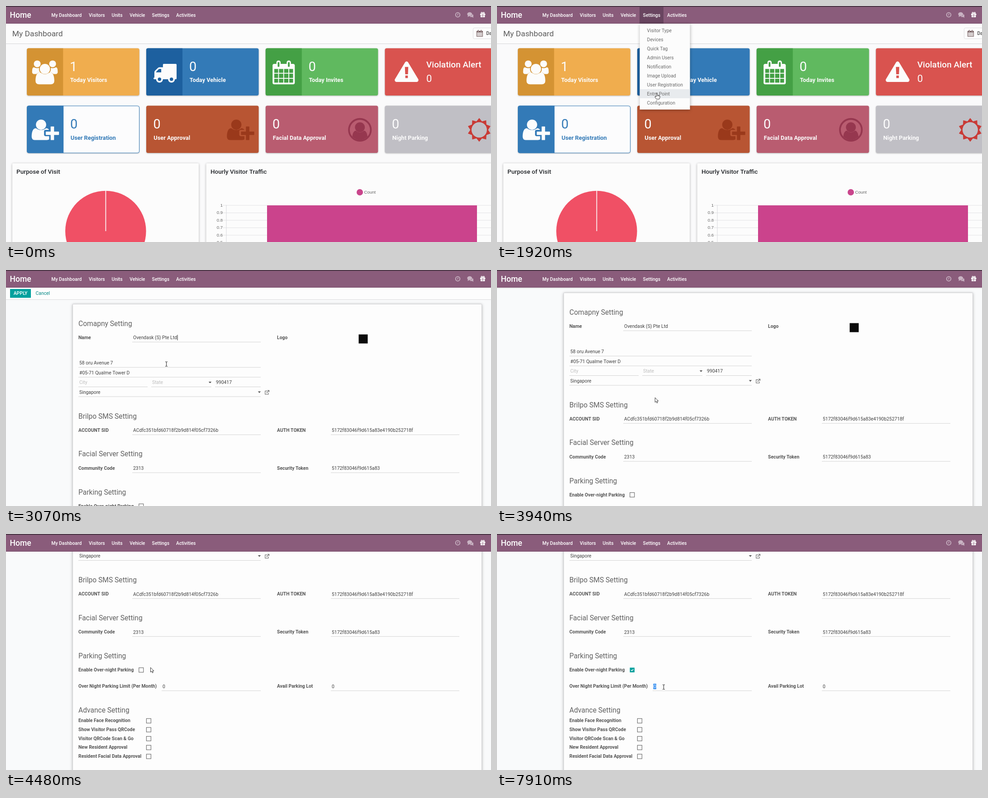
An HTML page with a canvas that plays this animation: 1072x522 px, repeating every 8000 ms.

```html
<!DOCTYPE html>
<html lang="en">
<head>
<meta charset="utf-8">
<title>Dashboard settings</title>
<style>
  html, body { margin: 0; width: 100%; height: 100%; overflow: hidden; background: #fafafb; }
  canvas { display: block; }
</style>
</head>
<body>
<canvas id="stage" width="1072" height="522"></canvas>
<script>
const ctx = document.getElementById('stage').getContext('2d');
const W = 1072, H = 522, LOOP = 8000, TAU = Math.PI * 2;
const TEAL = '#00a09d', INK = '#404040', ICON = 0.0295;

// ---------- helpers ----------
function text(str, x, y, size, color, weight = 400, family = 'Roboto') {
  ctx.font = `${weight} ${size}px "${family}", sans-serif`;
  ctx.fillStyle = color;
  ctx.fillText(str, x, y);
}
function rect(x, y, w, h, color) {
  ctx.fillStyle = color;
  ctx.fillRect(x, y, w, h);
}
function box(x, y, w, h, r, fill, stroke) {
  ctx.beginPath();
  ctx.roundRect(x, y, w, h, r);
  if (fill) { ctx.fillStyle = fill; ctx.fill(); }
  if (stroke) { ctx.strokeStyle = stroke; ctx.lineWidth = 1; ctx.stroke(); }
}
function disc(x, y, r, color) {
  ctx.fillStyle = color;
  ctx.beginPath();
  ctx.arc(x, y, r, 0, TAU);
  ctx.fill();
}
function shape(d, color, rule) {
  ctx.fillStyle = color;
  ctx.fill(new Path2D(d), rule || 'nonzero');
}
function raised(blur, alpha, draw) {
  ctx.save();
  ctx.shadowColor = `rgba(0,0,0,${alpha})`;
  ctx.shadowBlur = blur;
  ctx.shadowOffsetY = 1;
  draw();
  ctx.restore();
}
function at(x, y, s, draw) {
  ctx.save();
  ctx.translate(x, y);
  ctx.scale(s, s);
  draw();
  ctx.restore();
}

// ---------- icons, on a 1792-unit em ----------
function usersIcon(c) {
  const side = 'M593 896Q431 901 328 1024H194Q0 1024 0 865Q0 512 124 512C200 530 260 576 384 576Q451 576 517 553Q490 730 593 896Z';
  for (const flip of [1, -1]) {
    ctx.save();
    if (flip < 0) { ctx.translate(1920, 0); ctx.scale(-1, 1); }
    disc(384, 256, 256, c);
    shape(side, c);
    ctx.restore();
  }
  disc(960, 640, 384, c);
  shape('M1664 1533Q1664 1792 1397 1792H523Q256 1792 256 1533C256 1200 340 896 576 896C640 900 760 1035 960 1035C1160 1035 1280 900 1344 896C1580 896 1664 1200 1664 1533Z', c);
}
function truckIcon(c, bg) {
  box(768, 256, 1024, 1100, 64, c);
  box(64, 1280, 1728, 128, 60, c);
  shape('M128 1300V890Q128 820 180 770L380 570Q430 512 500 512H800V1340H128Z', c);
  shape('M256 896V860L470 640H640V896Z', bg);
  for (const x of [512, 1408]) {
    disc(x, 1408, 256, c);
    disc(x, 1408, 128, bg);
  }
}
function calendarIcon(c, bg) {
  box(0, 256, 1664, 1536, 128, c);
  for (const x of [288, 1056]) {
    box(x, 0, 320, 560, 160, c);
    box(x + 96, 128, 128, 352, 32, bg);
  }
  const cols = [[128, 288], [480, 320], [864, 320], [1248, 288]];
  const rows = [[640, 288], [992, 320], [1376, 288]];
  for (const [x, w] of cols) for (const [y, h] of rows) rect(x, y, w, h, bg);
}
function alertIcon(c, bg) {
  shape('M784 195Q896 50 1008 195L1776 1476Q1820 1640 1664 1664H128Q-28 1640 16 1476Z', c);
  shape('M770 544H1022L1000 1090H792Z', bg);
  rect(800, 1186, 192, 190, bg);
}
function userPlusIcon(c) {
  disc(704, 512, 384, c);
  box(1056, 1024, 992, 256, 32, c);
  box(1424, 640, 256, 1024, 32, c);
  shape('M928 1248Q928 1376 1056 1376H1312V1614Q1244 1664 1141 1664H267Q0 1664 0 1405C0 1072 84 768 320 768C350 768 450 907 704 907C958 907 1058 768 1088 768Q1220 768 1305 896H1056Q928 896 928 992Z', c);
}
function personRing(c) {
  ctx.strokeStyle = c;
  ctx.lineWidth = 128;
  ctx.beginPath();
  ctx.arc(896, 896, 820, 0, TAU);
  ctx.stroke();
  disc(896, 704, 370, c);
  shape('M330 1400C350 1120 460 960 600 960Q740 1090 896 1090T1192 960C1332 960 1442 1120 1462 1400Q1220 1664 896 1664T330 1400Z', c);
}
function sunIcon(c) {
  ctx.fillStyle = c;
  ctx.beginPath();
  for (let i = 0; i < 20; i++) {
    const r = i % 2 ? 668 : 890, a = i * TAU / 20 - TAU / 4;
    ctx.lineTo(896 + r * Math.cos(a), 896 + r * Math.sin(a));
  }
  ctx.closePath();
  ctx.moveTo(1472, 896);
  ctx.arc(896, 896, 576, 0, TAU);
  ctx.fill('evenodd');
}

// ---------- navigation bar ----------
const NAV = [['My Dashboard', 100.3], ['Visitors', 183], ['Units', 233.6], ['Vehicle', 273.2], ['Settings', 322.6], ['Activities', 376]];

function navBar(active) {
  rect(0, 0, W, 39, '#8a5c7b');
  if (active === 'Settings') rect(315, 2, 53, 37, '#694560');
  if (active === 'Activities') rect(368, 2, 58, 37, '#694560');
  rect(0, 38, W, 1, 'rgba(70,35,60,.3)');
  rect(0, 0, W, 1.7, '#3b2c38');
  text('Home', 8.4, 26, 17.6, '#fff', 500);
  for (const [label, x] of NAV) text(label, x, 23.7, 10.4, '#fff', 500);

  const dim = '#c9b3c3';
  ctx.strokeStyle = dim;
  ctx.lineWidth = 1.8;
  ctx.beginPath();
  ctx.arc(998.5, 19.5, 4.8, 0, TAU);
  ctx.stroke();
  ctx.lineWidth = 1.2;
  ctx.stroke(new Path2D('M999 16.5V20H996.5'));
  ctx.fillStyle = dim;
  ctx.beginPath();
  ctx.ellipse(1028.5, 21, 4.6, 3.6, 0, 0, TAU);
  ctx.fill();
  shape('M1029 23L1033 26.3L1032.5 21Z', dim);
  ctx.fillStyle = dim;
  ctx.strokeStyle = '#8a5c7b';
  ctx.beginPath();
  ctx.ellipse(1024.8, 18, 5.4, 4.2, 0, 0, TAU);
  ctx.stroke();
  ctx.fill();
  shape('M1021 20L1020.5 24.5L1025 21.5Z', dim);

  box(1048, 17, 11.4, 3.3, 0.6, '#fff');
  box(1049, 20.6, 9.4, 4.4, 0.8, '#fff');
  rect(1052.4, 17.6, 0.7, 7, '#8a5c7b');
  rect(1054.4, 17.6, 0.7, 7, '#8a5c7b');
  ctx.strokeStyle = '#fff';
  ctx.lineWidth = 1.4;
  ctx.beginPath();
  ctx.arc(1051.6, 15.5, 1.5, 0, TAU);
  ctx.moveTo(1057.4, 15.5);
  ctx.arc(1055.9, 15.5, 1.5, 0, TAU);
  ctx.stroke();
}

// ---------- dashboard ----------
function card(x, y, fill, side) {
  raised(3, 0.28, () => box(x, y, 248.5, 104.5, 4, fill));
  if (side) box(x, y, 80, 104.5, [4, 0, 0, 4], side);
}
function figure(num, label, x, y, color) {
  text(num, x - 1, y, 28.8, color);
  text(label, x - 0.2, y + 24.3, 12.8, color, 700);
}
function dashboard() {
  rect(0, 0, W, H, '#fafafb');
  rect(0, 39, W, 44, '#fcfcfc');
  rect(0, 83, W, 1, '#d4d4d8');
  text('My Dashboard', 13.8, 66.6, 17.4, '#5c5c5c');
  box(1032.5, 48.5, 60, 24, 3, '#fdfdfd', '#dddde0');
  at(1040, 53, 0.0084, () => calendarIcon('#6e5557', '#fdfdfd'));
  text('Dates', 1061.5, 64.3, 10.4, '#444', 500);

  const xs = [46.2, 310, 573.8, 837.5], y1 = 93.5, y2 = 220.6;
  card(xs[0], y1, '#f0ad4e', '#d49333');
  card(xs[1], y1, '#337ab7', '#1d609f');
  card(xs[2], y1, '#60b95f', '#44a045');
  card(xs[3], y1, '#d9534f');
  card(xs[0], y2, '#fcfcfd');
  card(xs[1], y2, '#b85533');
  card(xs[2], y2, '#b95c70');
  card(xs[3], y2, '#c0bfc5');
  box(xs[0], y2, 81, 104.5, [4, 0, 0, 4], '#337ab7');
  box(xs[0] + 0.4, y2 + 0.4, 248, 104, 4, null, '#337ab7');

  at(57.7, 120.4, ICON, () => usersIcon('#fcfcfc'));
  at(324.2, 120.4, ICON, () => truckIcon('#fcfcfc', '#1d609f'));
  at(589.2, 120.4, ICON, () => calendarIcon('#fcfcfc', '#44a045'));
  at(859, 118.8, ICON, () => alertIcon('#fcfcfc', '#d9534f'));
  at(56.7, 247.5, ICON, () => userPlusIcon('#fcfcfc'));
  at(488.3, 247.5, ICON, () => userPlusIcon('#9a391b'));
  at(755.8, 247.5, ICON, () => personRing('#96374f'));
  at(1019.5, 247.5, ICON, () => sunIcon('#c93a35'));

  figure('1', 'Today Visitors', 142, 144, '#fcfcfc');
  figure('0', 'Today Vehicle', 406, 144, '#fcfcfc');
  figure('0', 'Today Invites', 669.7, 144, '#fcfcfc');
  text('Violation Alert', 929, 136, 19, '#fcfcfc', 500);
  text('0', 929, 167.5, 22, '#fcfcfc');
  figure('0', 'User Registration', 143, 271.2, '#337ab7');
  figure('0', 'User Approval', 326.5, 271.2, '#fcfcfc');
  figure('0', 'Facial Data Approval', 590, 271.2, '#fcfcfc');
  figure('0', 'Night Parking', 854, 271.2, '#fcfcfc');

  raised(5, 0.3, () => {
    box(14, 348, 412, 220, 2, '#fcfcfc');
    box(442.5, 348, 700, 220, 2, '#fcfcfc');
  });
  text('Purpose of Visit', 23, 370.8, 13.5, '#222529', 500);
  text('Hourly Visitor Traffic', 452, 370.8, 13.5, '#222529', 500);
  disc(220.3, 498, 89.3, '#f05065');
  rect(219.6, 408, 1.7, 90, '#fcfcfc');

  disc(782, 412, 7, '#c9458c');
  text('Count', 791.5, 415.2, 9.6, '#666', 400, 'Liberation Sans');
  ctx.textAlign = 'right';
  for (let i = 0; i < 6; i++) {
    const y = 440.5 + i * 16.5;
    rect(479, y, W - 479, 0.9, '#dfdfe2');
    text(i ? '0.' + (10 - i) : '1', 479, y + 3.3, 9.6, '#666', 400, 'Liberation Sans');
  }
  ctx.textAlign = 'left';
  rect(486.6, 440, 0.9, 90, '#d6d6da');
  rect(577, 441, 464, 90, '#cb438c');
}

const MENU = ['Visitor Type', 'Devices', 'Quick Tag', 'Admin Users', 'Notification',
  'Image Upload', 'User Registration', 'Entry Point', 'Configuration'];

function dropdown(y) {
  raised(7, 0.35, () => rect(315.5, 39, 111, 190, '#fcfcfc'));
  const row = Math.floor((y - 44) / 20);
  if (row >= 0 && row < MENU.length) rect(316, 44 + row * 20, 110.5, 20, '#e8ebee');
  MENU.forEach((item, i) => text(item, 331.6, 57.9 + i * 20, 10.4, '#6a6a6a'));
}

// ---------- settings form ----------
function heading(str, y) { text(str, 160, y, 15.6, '#616161'); }
function label(str, x, y) { text(str, x, y, 10.4, '#555', 700); }
function line(x, x2, y) { rect(x, y, x2 - x, 0.9, '#cfcfcf'); }
function field(str, x, x2, y, color = INK) {
  text(str, x + 2, y, 10.4, color);
  line(x, x2, y + 5.8);
}
function caretDown(x, y) { shape(`M${x - 3.2} ${y - 1.5}h6.4l-3.2 3.4z`, '#505050'); }
function checkbox(x, y, on) {
  if (!on) {
    ctx.strokeStyle = '#666';
    ctx.lineWidth = 1.1;
    ctx.strokeRect(x - 5, y - 5, 10, 10);
    return;
  }
  rect(x - 5.2, y - 5.2, 10.4, 10.4, TEAL);
  ctx.strokeStyle = '#fff';
  ctx.lineWidth = 1.4;
  ctx.stroke(new Path2D(`M${x - 2.6} ${y}l1.9 1.9l3.4 -3.6`));
}
function settings(t, scroll, checked) {
  rect(0, 0, W, H, '#f9fafb');
  ctx.save();
  ctx.translate(0, -scroll);
  rect(0, 39, W, 26, '#fdfdfd');
  rect(0, 65, W, 1, '#dadadc');
  box(9, 42, 46, 19.5, 0, TEAL);
  text('APPLY', 16.7, 55.2, 10.4, '#fff', 500);
  text('Cancel', 65.5, 55.2, 10.4, '#008784');

  raised(6, 0.28, () => rect(147, 75, 904.5, 720, '#fdfdfd'));
  box(147.5, 75.5, 904, 720, 0, null, '#d3d3d6');

  heading('Comapny Setting', 123.5);
  label('Name', 160, 152.8);
  const name = 'Ovendask (S) Pte Ltd';
  field(name, 279, 563, 153);
  if (t < 3620) rect(281.5 + ctx.measureText(name).width, 143.5, 1, 12, '#222');
  label('Logo', 599, 152.8);
  rect(779.5, 142.5, 20, 20, '#0c0c0c');
  field('58 oru Avenue 7', 160, 563, 209);
  field('#05-71 Qualme Tower D', 160, 563, 230.8);
  field('City', 160, 313, 252.2, '#bdbdbd');
  field('State', 321, 454, 252.2, '#bdbdbd');
  field('990417', 462, 563, 252.2);
  caretDown(451, 248.5);
  field('Singapore', 160, 563, 273.8);
  caretDown(560, 270);
  ctx.strokeStyle = '#666';
  ctx.lineWidth = 1.1;
  ctx.stroke(new Path2D('M577.5 267.5H572.8V275H580V271.5M575.8 272L581 266.8M577.8 266.3H581.5V270'));

  heading('Brilpo SMS Setting', 328.6);
  label('ACCOUNT SID', 160, 357.8);
  field('ACdfc351bfd60718f2b9d814f05cf7326b', 279, 563, 358);
  label('AUTH TOKEN', 599, 357.8);
  field('5172f83046f9d615a83e4190b252718f', 718, 1002, 358);

  heading('Facial Server Setting', 412.4);
  label('Community Code', 160, 441.8);
  field('2313', 279, 563, 442);
  label('Security Token', 599, 441.8);
  field('5172f83046f9d615a83', 718, 1002, 442);

  heading('Parking Setting', 496.8);
  label('Enable Over-night Parking', 160, 525.9);
  checkbox(298.8, 522.3, checked);
  label('Over Night Parking Limit (Per Month)', 160, 561.6);
  if (t >= 7840) rect(345.5, 552.7, 6.5, 12, '#2f8bf0');
  field('0', 344, 563, 562, t >= 7840 ? '#fff' : INK);
  if (t >= 7760 && t < 7840) rect(352, 552.7, 1, 12, '#222');
  label('Avail Parking Lot', 599, 561.6);
  field('0', 718, 1002, 562);

  heading('Advance Setting', 616);
  ['Enable Face Recognition', 'Show Visitor Pass QRCode', 'Visitor QRCode Scan & Go',
    'New Resident Approval', 'Resident Facial Data Approval'].forEach((item, i) => {
    const y = 634.3 + i * 19.7;
    label(item, 160, y + 3.4);
    checkbox(315.4, y + 0.4);
  });
  ctx.restore();
}

// ---------- pointer ----------
// start, end, number of steps, destination
const MOVES = [
  [140, 770, 9, 344.5, 13],
  [1390, 1920, 8, 353, 192],
  [1990, 2150, 3, 353.5, 201],
  [2230, 2460, 4, 354.5, 208],
  [3320, 3380, 2, 354.5, 203],
  [3620, 3700, 2, 349, 282],
  [4300, 4620, 5, 303, 302],
  [4940, 5030, 2, 301.3, 301.5],
  [7120, 7530, 6, 368.5, 338.5]
];
function pointerAt(t) {
  let x = 456, y = -12;
  for (const [a, b, n, tx, ty] of MOVES) {
    if (t < a) break;
    const u = Math.min(n, Math.floor((t - a) / (b - a) * (n - 1) + 1e-6) + 1) / n;
    const e = u * u * (3 - 2 * u);
    x += (tx - x) * e;
    y += (ty - y) * e;
  }
  return [x, y];
}
function pointer(kind, x, y) {
  ctx.save();
  ctx.translate(x, y);
  ctx.lineJoin = 'round';
  ctx.strokeStyle = '#222';
  ctx.lineWidth = 0.9;
  if (kind === 'beam') {
    ctx.lineWidth = 1;
    ctx.stroke(new Path2D('M-2.5 -5H-.5L0 -4.4L.5 -5H2.5M0 -4.5V4.5M-2.5 5H-.5L0 4.4L.5 5H2.5'));
  } else {
    const d = kind === 'hand'
      ? 'M-1.2 .8Q0 -.6 1.2 .8V5L3 5.3L6 6.2Q7 6.6 7 8V10.5L5.6 14H-.6L-3.8 9.6Q-4.4 8 -3 7.8L-1.2 9Z'
      : 'M.3 .3V10.6L2.7 8.5L4.4 12.2L6.1 11.4L4.5 7.9H7.8Z';
    shape(d, '#fff');
    ctx.stroke(new Path2D(d));
    if (kind === 'hand') {
      ctx.lineWidth = 0.6;
      ctx.stroke(new Path2D('M1.2 5V8M3.1 5.5V8M5 6V8.2'));
    }
  }
  ctx.restore();
}

// ---------- clicks ----------
const CLICKS = [[1010, 1090, 344.5, 13.5], [2780, 2930, 354.5, 207.6],
  [5260, 5500, 301, 302], [5880, 6190, 301, 302], [6510, 6730, 301, 302]];
const TOGGLES = [5340, 6040, 6590];
const SCROLL = [25, 130, 212.7, 219, 221.5];

function clickGlow(t) {
  for (const [a, b, x, y] of CLICKS) {
    if (t < a || t >= b) continue;
    ctx.save();
    ctx.globalCompositeOperation = 'multiply';
    ctx.globalAlpha = Math.min(1, (b - t) / (b - a) * 2.5);
    disc(x, y, 9.6, '#f0f25c');
    ctx.restore();
  }
}

function draw(t) {
  const [x, y] = pointerAt(t);
  const open = t >= 1010 && t < 2930;
  let active = null, kind = 'arrow';
  if (t < 3070) {
    if (open) active = 'Settings';
    else if (y > 2 && y < 39 && x < 426) active = x < 368 ? 'Settings' : 'Activities';
    if (active) kind = 'hand';
    dashboard();
  } else {
    const i = Math.floor((t - 3940) / 70);
    const scroll = i < 0 ? 0 : SCROLL[Math.min(i, SCROLL.length - 1)];
    settings(t, scroll, TOGGLES.filter(v => t >= v).length % 2 === 1);
    if (t < 3620 || (t > 7300 && x > 344)) kind = 'beam';
  }
  navBar(active);
  if (open) dropdown(y);
  clickGlow(t);
  pointer(kind, x, y);
}

const start = performance.now();
function frame() {
  draw((performance.now() - start) % LOOP);
  requestAnimationFrame(frame);
}
frame();
</script>
</body>
</html>
```
